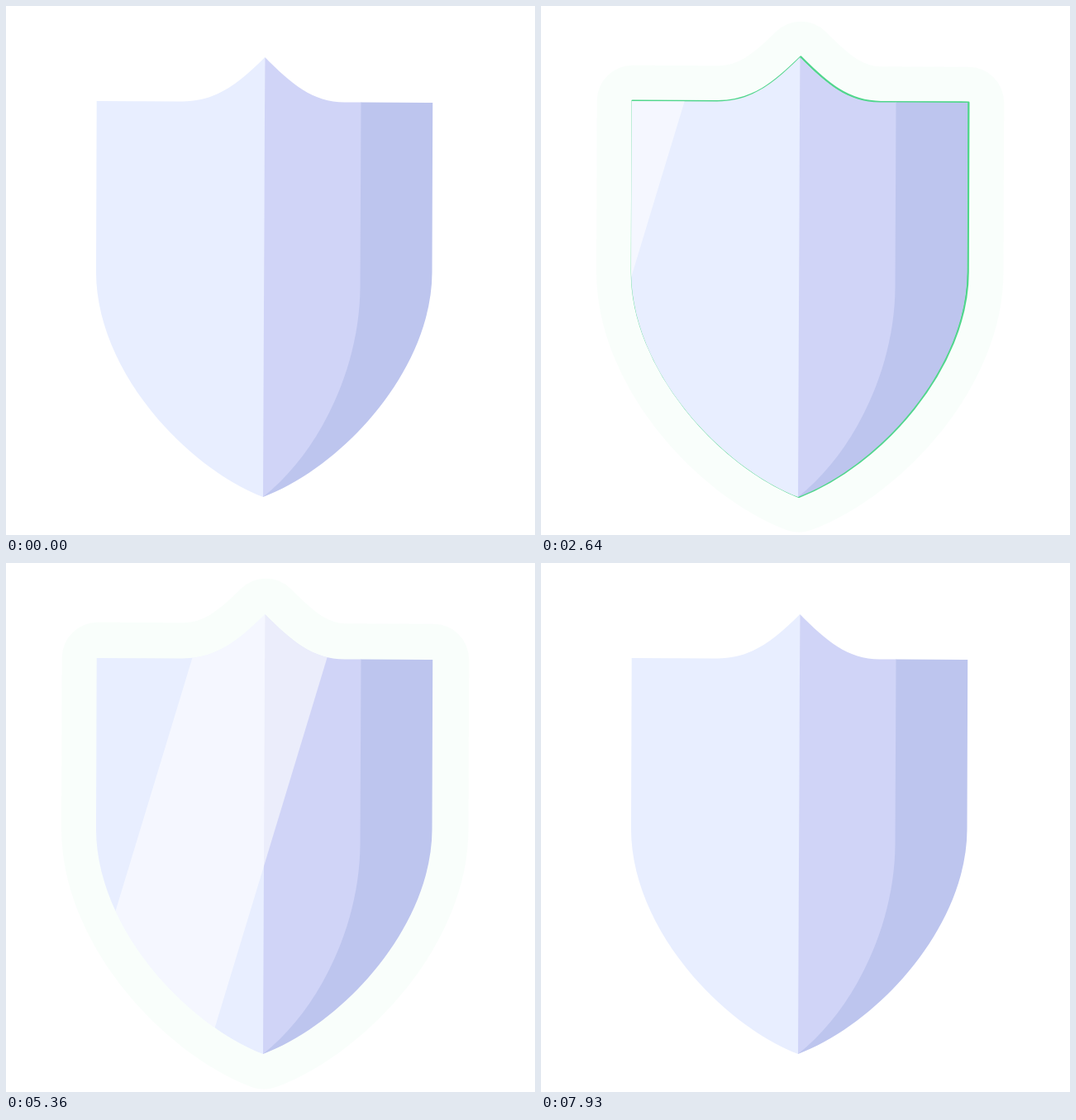
Animation of 640x640 px, one loop 8.43 s. Source, as an HTML page:

```html
<!DOCTYPE html>
<html lang="en">
<head>
<meta charset="utf-8">
<title>Shield</title>
<style>
  html, body { margin: 0; width: 100%; height: 100%; overflow: hidden; background: #fff; }
  svg { display: block; width: 100%; height: 100%; }
</style>
</head>
<body>
<svg viewBox="0 0 640 640">
  <defs>
    <path id="shield" d="M313.3 62C282 93 255 115.5 213 115.5L109.7 115L109 322C109 438 214 556 311 594C410 556 515.5 438 515.5 322L516.2 117L410 116.5C371 116.5 345 94 313.3 62Z"/>
    <clipPath id="inside"><use href="#shield"/></clipPath>
  </defs>
  <g fill="none" stroke="#4dd589" stroke-linejoin="round" transform="translate(1 -.3)">
    <use class="ring" href="#shield"/>
    <use class="ring" href="#shield"/>
  </g>
  <path fill="#e8eeff" d="M313.3 62C282 93 255 115.5 213 115.5L109.7 115L109 322C109 438 214 556 311 594L312 593Z"/>
  <path fill="#bdc5ee" d="M429 116.5L516.2 117L515.5 322C515.5 438 410 556 311 594L400 400Z"/>
  <path fill="#d0d4f7" d="M313.3 62C345 94 371 116.5 410 116.5L429.5 116.6L428.5 340C428 440 378 541 311 594Z"/>
  <g clip-path="url(#inside)">
    <path id="glare" fill="#fff" fill-opacity=".58" d="M19.7 50H182.7L15.8 600H-147.2Z"/>
  </g>
</svg>
<script>
  const LOOP = 8430, FRAME = 1000 / 14;
  const PULSE = 9, HOLD = 1;             // lengths in frames
  const runs = [0, 27, 57, 84];          // each run is two pulses, back to back
  const sweeps = [8.04, 36.78, 70.4, 98.88]; // frame at which the glare reaches x = 0
  const SPEED = 49, LEAD = 6;
  const rings = document.querySelectorAll('.ring');
  const glare = document.getElementById('glare');

  function drawRing(ring, age) {
    const shown = age > 0 && age <= PULSE + HOLD;
    const p = (1 - Math.cos(Math.PI * Math.min(age / PULSE, 1))) / 2;
    ring.setAttribute('visibility', shown ? 'visible' : 'hidden');
    if (!shown) return;
    ring.setAttribute('stroke-width', 86 * p);
    ring.setAttribute('stroke-opacity', 1 - 0.967 * p);
  }

  function draw(now) {
    const frame = Math.floor((now % LOOP + 6) / FRAME);
    const run = runs.findLast(start => start <= frame);
    rings.forEach((ring, i) => drawRing(ring, frame - run - i * PULSE));

    const sweep = sweeps.findLast(s => frame >= s - LEAD) ?? sweeps[0];
    glare.setAttribute('transform', `translate(${SPEED * (frame - sweep)} 0)`);
  }

  const begin = performance.now();
  function tick() {
    draw(performance.now() - begin);
    requestAnimationFrame(tick);
  }
  tick();
</script>
</body>
</html>
```
